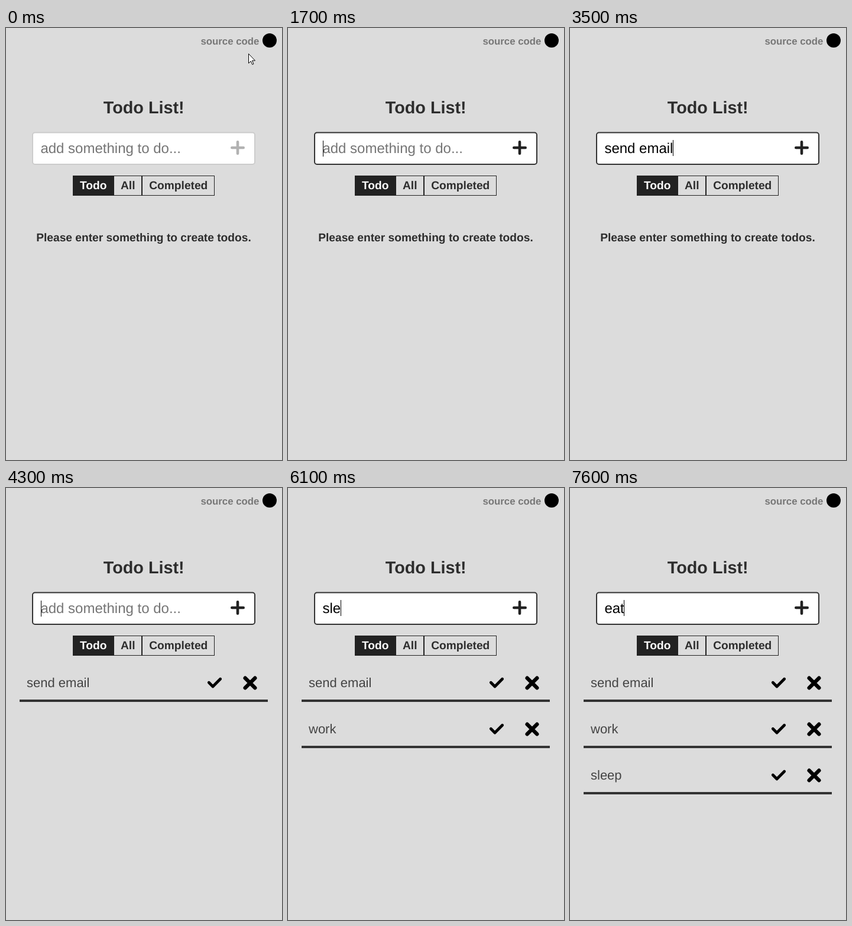
An HTML page that plays this animation: 467 by 729 pixels, repeating every 8000 ms.

```html
<!DOCTYPE html>
<html lang="en">
<head>
<meta charset="utf-8">
<title>Todo List</title>
<style>
  html, body { margin: 0; width: 100%; height: 100%; overflow: hidden; background: #dcdcdc; }
  svg { display: block; width: 100vw; height: 100vh; font-family: "Liberation Sans", Arial, sans-serif; }
  text { text-rendering: geometricPrecision; white-space: pre; }
  .bold { font-weight: bold; font-size: 19.2px; fill: #2d2d2d; }
  .field { font-size: 24px; }
  .tab { fill: none; stroke: #222; }
  .icon { fill: none; stroke: #000; stroke-linecap: round; stroke-linejoin: round; }
</style>
</head>
<body>
<svg viewBox="0 0 467 729">
  <defs>
    <g id="actions">
      <path class="icon" stroke-width="4.8" d="M343.3 328.3L350 335L362.7 322.3"/>
      <path class="icon" stroke-width="6.4" d="M404.7 320.7L421.3 337.3M421.3 320.7L404.7 337.3"/>
      <rect x="23" y="357" width="420" height="4" fill="#333"/>
    </g>
  </defs>

  <text x="329.5" y="28" font-size="16.8" font-weight="bold" fill="#777">source code</text>
  <circle cx="446" cy="21" r="12"/>
  <text class="bold" x="233.2" y="144" style="font-size:28.8px" text-anchor="middle">Todo List!</text>

  <rect id="box" x="45" y="176.5" width="376" height="53.5" rx="4" fill="#fff" stroke-width="2"/>
  <path id="plus" class="icon" stroke-width="4.6" d="M382.3 202H401.7M392 192.3V211.7"/>
  <text id="hint" class="field" x="58.4" y="211" fill="#757575">add something to do...</text>
  <text id="typed" class="field" x="58.4" y="211"></text>
  <rect id="caret" width="1" height="27"/>

  <rect x="113" y="249" width="70" height="34" fill="#222"/>
  <rect class="tab" x="182.5" y="249.5" width="47" height="33"/>
  <rect class="tab" x="230.5" y="249.5" width="122" height="33"/>
  <text class="bold" x="124.9" y="272" style="fill:#fff">Todo</text>
  <text class="bold" x="194" y="272">All</text>
  <text class="bold" x="242.2" y="272">Completed</text>

  <text id="empty" class="bold" x="233" y="360" text-anchor="middle">Please enter something to create todos.</text>
  <g id="list"></g>

  <path id="arrow" d="M.5 .5V16.5L4.2 13L6.8 18.6L9 17.6L6.5 12H11.5Z" fill="#fff" stroke="#000"/>
  <path id="beam" d="M-3 -8.5H-1L0 -7.5L1 -8.5H3M0 -7.5V7.5M-3 8.5H-1L0 7.5L1 8.5H3" fill="none" stroke="#000"/>
</svg>
<script>
const LOOP = 8000, TICK = 100, FADE = 300, FOCUS = 700;

// Key times for each word, one per letter, then the time Enter is pressed.
const WORDS = [
  { text: 'send email', keys: [2000, 2100, 2300, 2400, 2500, 2700, 3000, 3200, 3400, 3500], enter: 4000 },
  { text: 'work', keys: [4500, 4700, 4900, 5100], enter: 5500 },
  { text: 'sleep', keys: [5800, 5900, 6100, 6200, 6500], enter: 6900 },
  { text: 'eat', keys: [7200, 7400, 7600], enter: Infinity }
];

// Pointer positions: time, x, y.
const POINTER = [[0, 410, 43], [100, 404, 56], [300, 345, 130], [500, 285, 194],
                 [700, 255, 203], [800, 140, 192], [900, 8, 170]];

const $ = id => document.getElementById(id);
const clamp = v => Math.max(0, Math.min(1, v));
const show = (el, on) => { el.style.visibility = on ? 'visible' : 'hidden'; };
const grey = (from, to, k) => {
  const v = Math.round(from + (to - from) * k);
  return `rgb(${v},${v},${v})`;
};

const rows = WORDS.slice(0, 3).map(({ text }, i) => {
  $('list').insertAdjacentHTML('beforeend',
    `<g transform="translate(0 ${i * 78})"><text x="35" y="336" font-size="22" fill="#444">${text}</text><use href="#actions"/></g>`);
  return $('list').lastElementChild;
});

function pointerAt(t) {
  const i = Math.max(1, POINTER.findIndex(p => p[0] >= t));
  const [t0, x0, y0] = POINTER[i - 1], [t1, x1, y1] = POINTER[i];
  const k = (t - t0) / (t1 - t0);
  return [Math.round(x0 + (x1 - x0) * k), Math.round(y0 + (y1 - y0) * k)];
}

function drawPointer(t) {
  const visible = t <= 900;
  const [x, y] = visible ? pointerAt(t) : [0, 0];
  const overField = x > 44 && x < 422 && y > 175;
  show($('arrow'), visible && !overField);
  show($('beam'), visible && overField);
  for (const id of ['arrow', 'beam']) $(id).setAttribute('transform', `translate(${x} ${y})`);
}

function drawField(t) {
  const focus = clamp((t - FOCUS) / FADE);
  $('box').setAttribute('stroke', grey(204, 51, focus));
  $('plus').style.stroke = grey(178, 34, focus);

  const word = WORDS.find(w => t < w.enter);
  const value = word.text.slice(0, word.keys.filter(k => k <= t).length);
  const typed = $('typed');
  if (typed.textContent !== value) typed.textContent = value;
  show($('hint'), !value);

  const caretX = value ? Math.floor(58.4 + typed.getComputedTextLength()) : 59;
  $('caret').setAttribute('x', caretX);
  $('caret').setAttribute('y', value ? 189 : 190);
  show($('caret'), t >= FOCUS && !(t >= 1200 && t < 1700));
}

function drawList(t) {
  show($('empty'), t < WORDS[0].enter);
  rows.forEach((row, i) => { row.style.opacity = clamp((t - WORDS[i].enter) / FADE); });
}

function render(now) {
  const t = Math.floor((now % LOOP) / TICK) * TICK;
  drawPointer(t);
  drawField(t);
  drawList(t);
}

const start = performance.now();
function loop() {
  render(performance.now() - start);
  requestAnimationFrame(loop);
}
loop();
</script>
</body>
</html>
```
